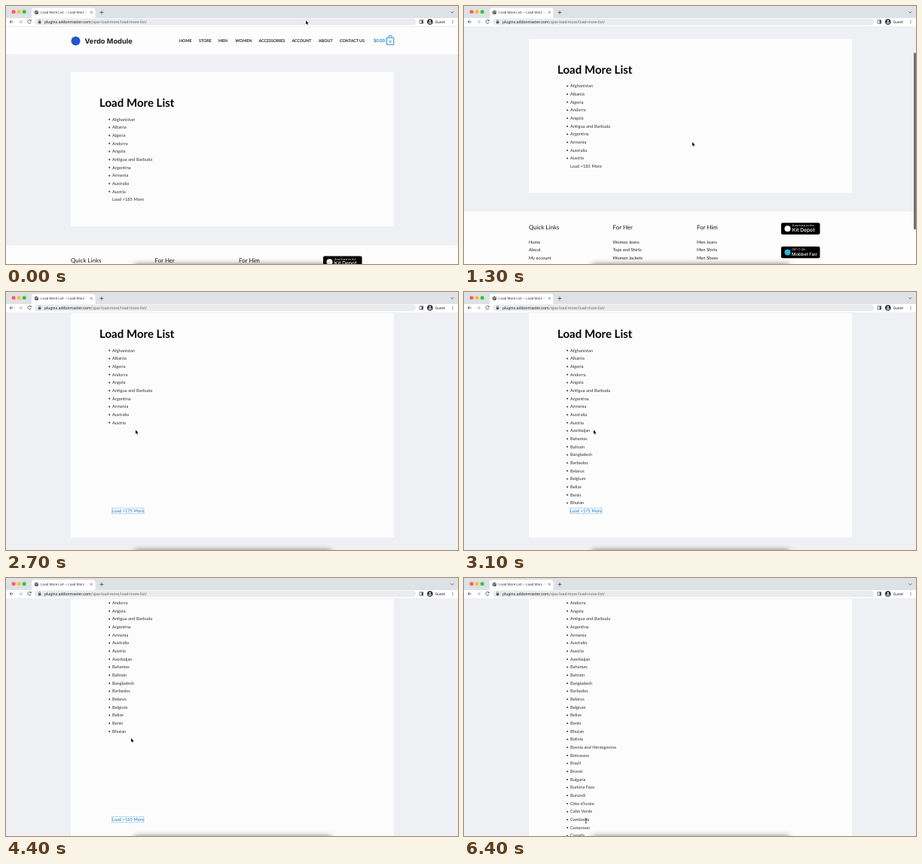
Animation of 600 by 343 pixels, one loop 6.9 s. Source, as an HTML page with a canvas:

```html
<!DOCTYPE html>
<html lang="en">
<head>
<meta charset="utf-8">
<title>Load More List</title>
<style>
  html, body { margin: 0; width: 100%; height: 100%; overflow: hidden; background: #fdfdfd; }
  canvas { display: block; width: 600px; height: 343px; }
</style>
</head>
<body>
<canvas id="stage"></canvas>
<script>
const W = 600, H = 343, LOOP = 6900, STEP = 100;
const TOP = 28, ROW = 10.67;
const LATO = 'Lato, sans-serif', UI = 'Roboto, sans-serif', BRAND = 'Inter, sans-serif';
const BLUE = '#1a79c0', INK = '#343434';
const CLICKS = [2700, 4400, 6000];

const COUNTRIES = ('Afghanistan,Albania,Algeria,Andorra,Angola,Antigua and Barbuda,Argentina,Armenia,' +
  'Australia,Austria,Azerbaijan,Bahamas,Bahrain,Bangladesh,Barbados,Belarus,Belgium,Belize,Benin,' +
  'Bhutan,Bolivia,Bosnia and Herzegovina,Botswana,Brazil,Brunei,Bulgaria,Burkina Faso,Burundi,' +
  'Côte d’Ivoire,Cabo Verde,Cambodia,Cameroon,Canada,Central African Republic,Chad,Chile,China,' +
  'Colombia,Comoros,Congo').split(',');

const MENU = [['HOME', 230], ['STORE', 256], ['MEN', 282], ['WOMEN', 304.3], ['ACCESSORIES', 335.5],
  ['ACCOUNT', 379.5], ['ABOUT', 415], ['CONTACT US', 443]];

const FOOTER = [
  [86, 'Quick Links', 'Home', 'About', 'My account', 'Cart', 'Contact Us'],
  [197.5, 'For Her', 'Women Jeans', 'Tops and Shirts', 'Women Jackets', 'Heels and Flats', 'Women Accessories'],
  [309, 'For Him', 'Men Jeans', 'Men Shirts', 'Men Shoes', 'Men Accessories', 'Men Jackets']
];

// time, x, y of the pointer tip
const POINTER = [[0, 398, 19.3], [200, 398, 19.3], [600, 303, 181], [1650, 303, 181], [2000, 208, 191.5],
  [2300, 172, 183.6], [3900, 172, 183.6], [4200, 166, 213], [4500, 166, 213], [4800, 162.5, 224.5],
  [4950, 162.5, 224.5], [5450, 162, 320], [LOOP, 162, 320]];

const canvas = document.getElementById('stage');
const ctx = canvas.getContext('2d');
const ratio = window.devicePixelRatio || 1;
canvas.width = W * ratio;
canvas.height = H * ratio;
ctx.textRendering = 'geometricPrecision';

const clamp = v => Math.max(0, Math.min(1, v));
const smooth = (t, a, b) => { const p = clamp((t - a) / (b - a)); return p * p * (3 - 2 * p); };

function rect(x, y, w, h, color, r = 0) {
  ctx.fillStyle = color;
  ctx.beginPath();
  ctx.roundRect(x, y, w, h, r);
  ctx.fill();
}

function disc(x, y, r, color) {
  ctx.fillStyle = color;
  ctx.beginPath();
  ctx.arc(x, y, r, 0, Math.PI * 2);
  ctx.fill();
}

function text(str, x, y, size, color, weight = 400, family = LATO) {
  ctx.font = `${weight} ${size}px ${family}`;
  ctx.fillStyle = color;
  ctx.fillText(str, x, y);
  return x + ctx.measureText(str).width;
}

function line(path, color, width = 0.8) {
  ctx.strokeStyle = color;
  ctx.lineWidth = width;
  ctx.stroke(new Path2D(path));
}

function pointerAt(t) {
  const i = Math.max(1, POINTER.findIndex(k => k[0] > t));
  const [t0, x0, y0] = POINTER[i - 1], [t1, x1, y1] = POINTER[i];
  const p = smooth(t, t0, t1);
  return { x: x0 + (x1 - x0) * p, y: y0 + (y1 - y0) * p };
}

function stateAt(t) {
  const loads = CLICKS.filter(c => t >= c).length;
  const scroll = 73 * smooth(t, 900, 1600) + 76.6 * smooth(t, 3300, 3700);
  const count = 10 + loads * 10;
  const linkY = 150.5 + count * ROW;
  const pointer = pointerAt(t);
  const hover = pointer.x > 140 && pointer.x < 184 && Math.abs(pointer.y - linkY + scroll) < 5;
  const barAlpha = t < 2500 ? (scroll > 0 ? 1 - smooth(t, 2000, 2300) : 0)
    : (t >= 3400 ? 1 - smooth(t, 4100, 4400) : 0);
  return { t, loads, scroll, count, linkY, pointer, hover, barAlpha };
}

function drawHeader() {
  rect(0, TOP, W, 36, '#fdfdfd');
  disc(92.5, 46.5, 6, '#2456c8');
  text('Verdo Module', 104.5, 49.5, 9.3, '#1f2127', 700, BRAND);
  for (const [label, x] of MENU) text(label, x, 48.3, 5.33, '#222', 700);
  text('$0.00', 488, 48.4, 5.8, '#1585cf', 700);
  line('M505.5 42.2h9.2v9.2h-9.2zM508 42v-.8a2.1 2.1 0 0 1 4.2 0v.8', '#1585cf', 0.9);
  text('0', 508.7, 48.8, 4.8, '#1585cf', 700);
}

function drawList(s) {
  text('Load More List', 124, 134, 15.05, '#050505', 700);
  for (let i = 0; i < s.count; i++) {
    const y = 150.5 + i * ROW;
    const click = CLICKS[Math.floor(i / 10) - 1];
    ctx.globalAlpha = i < 10 ? 1 : smooth(s.t, click, click + 400);
    disc(137.2, y + 0.3, 1, INK);
    text(COUNTRIES[i], 141, y + 2.1, 5.78, INK);
  }
  ctx.globalAlpha = 1;
  const active = s.hover || s.loads > 0;
  text(`Load +${185 - s.loads * 10} More`, 141, s.linkY + 2.1, 5.78, active ? BLUE : INK);
  if (s.loads) {
    ctx.setLineDash([0.8, 0.5]);
    line(`M140.7 ${s.linkY - 3.6}h42.3v7.4h-42.3z`, BLUE, 0.5);
    ctx.setLineDash([]);
  }
}

function drawBadge(y, small, name, x, size, color) {
  rect(421, y, 51.5, 15.5, '#000', 2);
  disc(429.5, y + 7.8, 4, color);
  text(small, x, y + 5.2, 3.6, '#fff', 400, BRAND);
  text(name, x, y + 11.9, size, '#fff', 500, BRAND);
}

function drawFooter(top) {
  rect(0, top, W, 160, '#fdfdfd');
  rect(0, top, W, 0.6, '#e0e2e6');
  for (const [x, heading, ...links] of FOOTER) {
    text(heading, x, top + 24.1, 7.95, '#1c1c1c');
    links.forEach((label, i) => text(label, x, top + 42.8 + i * ROW, 5.78, '#222'));
  }
  drawBadge(top + 15.5, 'Download on the', 'Kit Depot', 435.8, 6.7, '#fff');
  drawBadge(top + 47, 'GET IT ON', 'Mobbet Fair', 435, 5.9, '#19b8e6');
}

function drawPage(s) {
  const grow = s.loads * 10 * ROW;
  ctx.save();
  ctx.beginPath();
  ctx.rect(0, TOP, W, H - TOP);
  ctx.clip();
  rect(0, TOP, W, H, '#eef0f4');
  ctx.translate(0, -s.scroll);
  drawHeader();
  rect(86, 88, 429, 204.8 + grow, '#fcfcfc');
  drawList(s);
  drawFooter(317 + grow);
  ctx.restore();

  if (s.barAlpha > 0) {
    const view = H - TOP, scale = view / (422 + grow);
    ctx.globalAlpha = s.barAlpha;
    rect(597, TOP + 1 + s.scroll * scale, 3, view * scale, '#707173', 1.5);
    ctx.globalAlpha = 1;
  }
}

function drawBrowser() {
  rect(0, 0, W, 16, '#dee1e6');
  ['#fe5f57', '#febc2e', '#28c840'].forEach((c, i) => disc(10 + i * 7.1, 7.7, 2.5, c));
  rect(34, 2.6, 84.5, 14, '#fff', [3.5, 3.5, 0, 0]);
  disc(40.5, 8.4, 2.7, '#55585d');
  line('M38.6 7.2l1.6.9-.4 1.7M41.3 6.2l.4 1.5 1.2.5', '#fff', 0.6);
  const fade = ctx.createLinearGradient(101, 0, 108, 0);
  fade.addColorStop(0, '#35383c');
  fade.addColorStop(1, '#35383c00');
  text('Load More List – Load More A', 46, 10.1, 4.65, fade, 400, UI);
  line('M111.8 6.9l3 3M114.8 6.9l-3 3', '#5f6368', 0.7);
  line('M124.5 8.5h5M127 6v5', '#44474b');
  line('M590.3 7.2l2 2 2-2', '#44474b');

  rect(0, 16, W, 12, '#fff');
  rect(38, 16.5, 506, 9, '#e9ebed', 4.5);
  line('M9.8 21H5.3M7.3 18.8L5 21l2.3 2.2', '#4b4e52');
  line('M17 21h4.5M19.4 18.8l2.3 2.2-2.3 2.2', '#a5a8ac');
  line('M33 19.4a2.3 2.3 0 1 0 .3 2.3M33.3 18.2v1.7h-1.7', '#4b4e52');
  rect(42.8, 20.3, 3.6, 2.9, '#55585d', 0.4);
  line('M43.5 20.4v-.8a1.1 1.1 0 0 1 2.2 0v.8', '#55585d', 0.6);
  const end = text('plugins.addonmaster.com', 51, 22.8, 5.33, '#25282c', 400, UI);
  text('/ajax-load-more/load-more-list/', end, 22.8, 5.33, '#6a6e73', 400, UI);

  line('M549 18.8h4.6v4.4H549z', '#44474b', 0.7);
  rect(551.6, 18.8, 2, 4.4, '#44474b');
  disc(562.8, 21, 3.8, '#303236');
  disc(562.8, 19.9, 1.1, '#fff');
  rect(560.7, 21.7, 4.2, 1.5, '#fff', 0.7);
  text('Guest', 569.5, 22.8, 5.2, '#303236', 400, UI);
  for (let i = -1; i <= 1; i++) disc(593, 21 + i * 1.8, 0.55, '#44474b');
  rect(0, 27.4, W, 0.6, '#dcdee1');
}

function drawDockShadow() {
  ctx.save();
  ctx.shadowColor = 'rgba(0,0,0,.5)';
  ctx.shadowBlur = 7 * ratio;
  rect(170, H, 262, 20, '#000', 4);
  ctx.restore();
}

function drawPointer(s) {
  const { x, y } = s.pointer;
  ctx.save();
  ctx.translate(x, y);
  ctx.lineJoin = 'round';
  if (s.t >= CLICKS[2]) {
    line('M-1.2 0q1.2 0 1.2.8q0-.8 1.2-.8M0 .8v4.4M-1.2 6q1.2 0 1.2-.8q0 .8 1.2.8', '#222', 0.7);
  } else {
    const shape = s.hover
      ? 'M-.6 .2q.6-.6 1.1 0v2.2l2.2.6q.8.2.6 1.2l-.6 2.1h-2.8l-1.8-2.3q0-.8.8-.6l.5.4z'
      : 'M0 0v5l1.2-1 .8 1.8 .9-.4-.8-1.7h1.6z';
    line(shape, s.hover ? '#111' : '#fff', 0.9);
    ctx.fillStyle = s.hover ? '#fff' : '#050505';
    ctx.fill(new Path2D(shape));
  }
  ctx.restore();
}

function render(now) {
  const t = Math.floor((now % LOOP) / STEP) * STEP;
  const s = stateAt(t);
  ctx.setTransform(ratio, 0, 0, ratio, 0, 0);
  drawPage(s);
  drawBrowser();
  drawDockShadow();
  drawPointer(s);
}

let start = null;
function tick(now) {
  if (start === null) start = now;
  render(Math.max(0, now - start));
  requestAnimationFrame(tick);
}
render(0);
requestAnimationFrame(tick);
</script>
</body>
</html>
```
